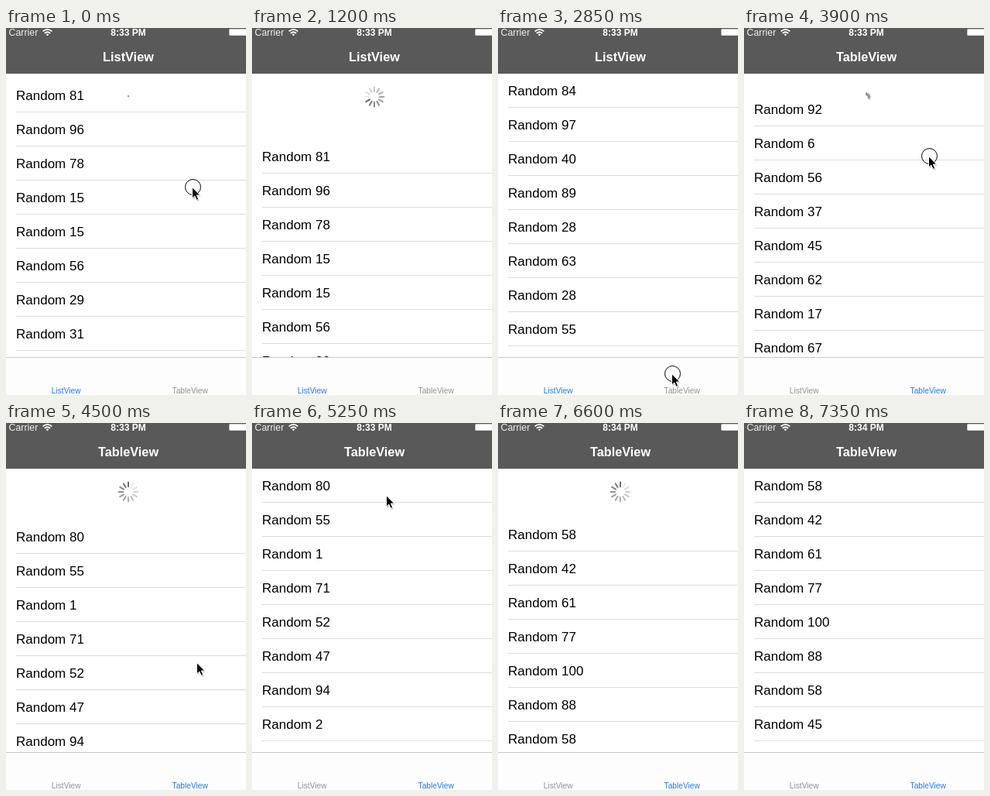
Animation, 310 px wide and 474 px high, one loop 8280 ms. Source, as an HTML page:

```html
<!DOCTYPE html>
<html lang="en">
<head>
<meta charset="utf-8">
<title>Pull to refresh</title>
<style>
  html, body { margin: 0; width: 100%; height: 100%; overflow: hidden; background: #fff; }
  svg { display: block; font-family: "Liberation Sans", Arial, sans-serif; }
  .row { font-size: 17px; }
  .title { font-size: 16.3px; font-weight: bold; fill: #fff; text-anchor: middle; }
  .tab { font-size: 10.2px; text-anchor: middle; }
  .clock { font-size: 12px; font-weight: bold; fill: #fff; text-anchor: middle; }
  .carrier { font-size: 12.4px; fill: #eee; }
  .tick { stroke: #3c3c44; stroke-width: 2; stroke-linecap: round; vector-effect: non-scaling-stroke; }
</style>
</head>
<body>
<svg width="310" height="474" viewBox="0 0 310 474">
  <defs>
    <clipPath id="view"><rect y="59" width="310" height="366"/></clipPath>
    <path id="arrow" d="M.5 .7V15L3.8 12L6.1 17.3L8.7 16.2L6.4 11H10.7Z"/>
  </defs>
  <g clip-path="url(#view)">
    <g id="list"></g>
    <g id="spinner"></g>
  </g>
  <rect width="310" height="59" fill="#595959"/>
  <text class="carrier" x="3.5" y="10">Carrier</text>
  <g fill="none" stroke="#fff" stroke-width="1.7">
    <path d="M47.6 4.4Q53.5 -.8 59.4 4.4M49.8 6.9Q53.5 3.6 57.2 6.9"/>
    <path d="M51.6 8.2Q53.5 6.6 55.4 8.2L53.5 10.2Z" fill="#fff" stroke="none"/>
  </g>
  <rect x="288.5" y="1.5" width="22" height="8" rx="1" fill="#fff" stroke="#ccc"/>
  <text id="clock" class="clock" x="158" y="10"></text>
  <text id="title" class="title" x="158" y="43"></text>
  <rect y="425" width="310" height="49" fill="#fdfdfd"/>
  <rect y="425" width="310" height="1" fill="#c6c6c6"/>
  <text id="tab0" class="tab" x="77.7" y="471.5">ListView</text>
  <text id="tab1" class="tab" x="237.7" y="471.5">TableView</text>
  <g id="cursor">
    <circle id="ring" cx="1.5" cy=".5" r="10" fill="none" stroke="#000"/>
    <use href="#arrow" x="1" y="1.5" opacity=".25"/>
    <use href="#arrow" stroke="#fff"/>
  </g>
</svg>
<script>
const LOOP = 8280, STEP = 150, ROW = 44, ROWS = 9;
const PEAK = 104, REST = 60, TAU = 100, RELOAD = 200, HOLD = 450;
const TAP = 2850, SWITCH = 3000, MINUTE = 6000, RETURN = 2100;

const PULLS = [
  { start: -180, release: 1143, spin: 610, strokes: 2, data: "84 97 40 89 28 63 28 55" },
  { start: 3680, release: 4300, spin: 4500, strokes: 1, data: "80 55 1 71 52 47 94 2" },
  { start: 5380, release: 6332, spin: 6600, strokes: 1, data: "58 42 61 77 100 88 58 45" }
];
const FIRST = "81 96 78 15 15 56 29 31";

// [time, x, y] of the pointer tip
const PATH = [
  [0, 240, 205], [1143, 242, 385], [RETURN, 300, 330], [2750, 224, 446], [2950, 224, 446],
  [3450, 236, 130], [3680, 236, 130], [4450, 246, 309], [4600, 246, 309],
  [5250, 173, 93], [5380, 173, 93], [6332, 178, 275]
];

const $ = id => document.getElementById(id);
const clamp = v => Math.max(0, Math.min(1, v));
const smooth = u => u * u * (3 - 2 * u);
const decay = ms => Math.exp(-ms / TAU);
const random = seed => 1 + Math.floor(Math.abs(Math.sin(seed * 12.9898) * 43758.5453) % 1 * 99);

// Finger travel from 0 to 1, pausing between strokes
function stroke(u, count) {
  const w = 2 * Math.PI * count;
  return u - Math.sin(w * u) / w;
}

function offset({ start, release, strokes }, t) {
  if (t < release) return PEAK * stroke((t - start) / (release - start), strokes);
  const end = release + HOLD;
  return t < end ? REST + (PEAK - REST) * decay(t - release) : REST * decay(t - end);
}

function numbers(t) {
  const done = PULLS.filter(p => t >= p.release + RELOAD).pop();
  if (t >= SWITCH && done === PULLS[0]) return [];
  return (done ? done.data : FIRST).split(" ");
}

function pointer(t) {
  const n = PATH.findIndex(p => p[0] > t);
  if (n < 0) return PATH[PATH.length - 1].slice(1);
  const a = PATH[n - 1], b = PATH[n];
  const u = smooth((t - a[0]) / (b[0] - a[0]));
  return [1, 2].map(k => Math.round(a[k] + (b[k] - a[k]) * u));
}

function add(parent, tag, attrs) {
  const el = document.createElementNS("http://www.w3.org/2000/svg", tag);
  for (const k in attrs) el.setAttribute(k, attrs[k]);
  return parent.appendChild(el);
}

const rows = Array.from({ length: ROWS }, (_, i) => {
  add($("list"), "rect", { x: 13, y: 102 + i * ROW, width: 297, height: 1, fill: "#dcdcdc" });
  return add($("list"), "text", { class: "row", x: 13, y: 86.6 + i * ROW });
});

const ticks = Array.from({ length: 12 }, (_, i) => add($("spinner"), "path", {
  class: "tick", d: "M0 -6.8V-12.4", transform: `rotate(${i * 30})`
}));

function drawSpinner(t, off, spin) {
  const head = Math.ceil((t - spin) * 12 / 1000);
  ticks.forEach((tick, i) => {
    const age = (head - i + 12) % 12;
    tick.setAttribute("opacity", t < spin
      ? 0.5 * clamp(off / 5 - i)
      : 0.1 + 0.65 * (1 - (age + 12) % 12 / 11));
  });
  $("spinner").setAttribute("transform", `translate(158 89) scale(${clamp(off / REST)})`);
  $("spinner").setAttribute("visibility", off ? "visible" : "hidden");
}

function drawCursor(t, pull) {
  const shown = t < PULLS[0].release || (t >= RETURN && t < PULLS[2].release);
  const pressed = t < pull.release || (t >= TAP && t < SWITCH);
  $("cursor").setAttribute("visibility", shown ? "visible" : "hidden");
  $("cursor").setAttribute("transform", `translate(${pointer(t).join(" ")})`);
  $("ring").setAttribute("opacity", pressed ? 1 : 0);
}

function draw(time) {
  const t = Math.floor(time / STEP) * STEP;
  const pull = PULLS.filter(p => t >= p.start).pop();
  const off = Math.round(offset(pull, t));
  const tab = t < SWITCH ? 0 : 1;
  const data = numbers(t);

  rows.forEach((row, i) => { row.textContent = "Random " + (data[i] || random(i + 1)); });
  $("list").setAttribute("transform", `translate(0 ${off})`);
  $("clock").textContent = t < MINUTE ? "8:33 PM" : "8:34 PM";
  $("title").textContent = $("tab" + tab).textContent;
  $("tab" + tab).setAttribute("fill", "#2478f5");
  $("tab" + (1 - tab)).setAttribute("fill", "#929292");
  drawSpinner(t, off, pull.spin);
  drawCursor(t, pull);
}

const begin = performance.now();
function frame() {
  draw((performance.now() - begin) % LOOP);
  requestAnimationFrame(frame);
}
frame();
</script>
</body>
</html>
```
